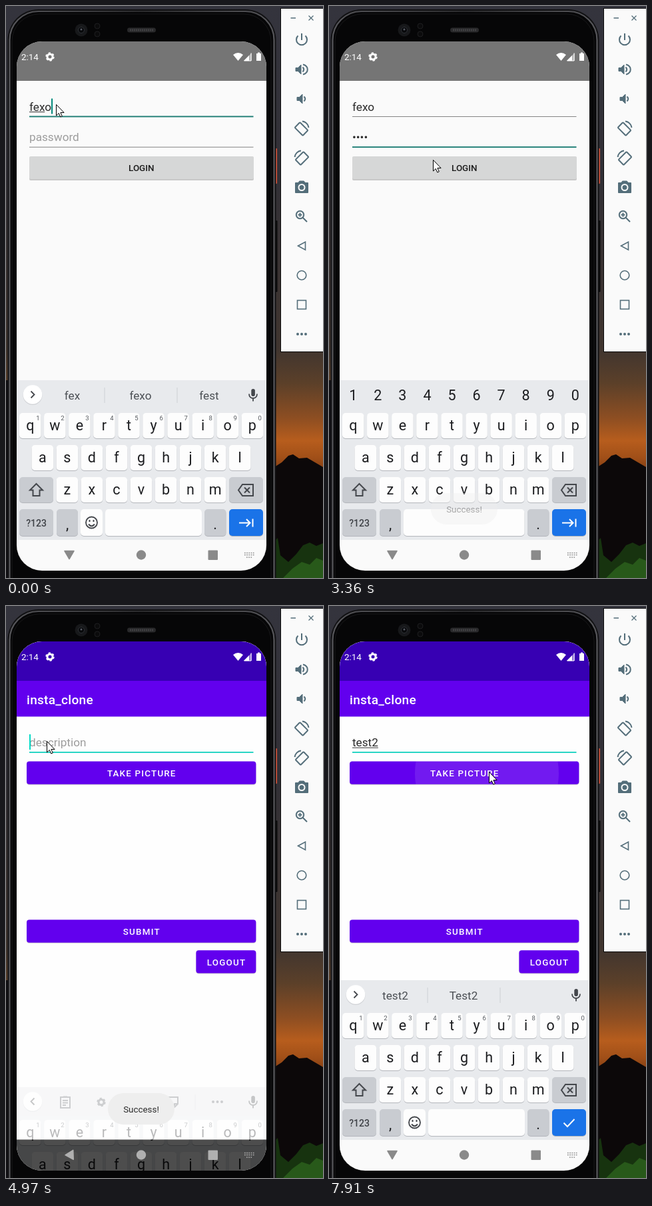
Recreate the animation shown at these times as an HTML page. Size 476 by 856 pixels, loop 8000 ms.

```html
<!DOCTYPE html>
<html lang="en">
<head>
<meta charset="utf-8">
<title>Login demo</title>
<style>
html, body { margin: 0; width: 100%; height: 100%; overflow: hidden; background: #0b0809; }
svg { display: block; width: 476px; height: 856px; font-family: Roboto, sans-serif; }
text { white-space: pre; }
.mid { text-anchor: middle; }
.field { font-size: 17.2px; }
.btn { font-size: 13.4px; font-weight: 500; text-anchor: middle; }
.wide { fill: #fff; letter-spacing: 1.2px; }
.key { font-size: 21.5px; fill: #1c1d20; text-anchor: middle; }
.line { fill: none; stroke-width: 2; }
.off { display: none; }
</style>
</head>
<body>
<svg id="stage" viewBox="0 0 476 856">
  <defs>
    <linearGradient id="sky" x2="0" y2="1">
      <stop offset="0" stop-color="#34343d"/>
      <stop offset=".3" stop-color="#323036"/>
      <stop offset=".6" stop-color="#40352f"/>
      <stop offset=".66" stop-color="#5c4029"/>
      <stop offset=".72" stop-color="#8d4e22"/>
      <stop offset=".76" stop-color="#b75d1d"/>
      <stop offset=".79" stop-color="#a04f18"/>
      <stop offset=".83" stop-color="#6a3011"/>
    </linearGradient>
    <linearGradient id="rim" x2="1">
      <stop offset="0" stop-color="#57575b"/>
      <stop offset=".5" stop-color="#2a2a2c"/>
      <stop offset="1" stop-color="#57575b"/>
    </linearGradient>
    <clipPath id="screen"><rect x="16" y="53" width="375" height="792" rx="38"/></clipPath>
    <clipPath id="loginClip"><rect x="35" y="225" width="337" height="34" rx="2"/></clipPath>
    <clipPath id="picClip"><rect x="31" y="232.400" width="344.400" height="34.400" rx="4"/></clipPath>
    <g id="gear">
      <circle r="4" fill="none" stroke="currentColor" stroke-width="3"/>
      <circle r="5.6" fill="none" stroke="currentColor" stroke-width="2.2" stroke-dasharray="3 2.86"/>
    </g>
    <g id="turn" class="line" stroke="#546e7a">
      <rect x="-5.500" y="-8.500" width="11" height="17" rx="1" transform="translate(-.5 1) rotate(-45)"/>
      <path d="M1-10.500A11 11 0 0 1 10.500-1"/>
    </g>
  </defs>

  <!-- wallpaper -->
  <rect width="476" height="856" fill="url(#sky)"/>
  <rect y="560" width="5" height="296" fill="#111014"/>
  <path d="M400 692L414 683 424 673 431 671 440 677 452 676 464 683 476 690V856H400Z" fill="#0c0809"/>
  <path d="M404 856V800L408 796 412 822 424 832 436 820 446 807 456 803 466 808 476 804V856Z" fill="#17330f"/>
  <path d="M416 856L430 842 444 832 456 836 466 826 476 830V856Z" fill="#28591a"/>

  <!-- phone body -->
  <rect x="403" y="213" width="4" height="53" rx="1" fill="#e2593f"/>
  <rect x="403" y="321" width="4.500" height="107" rx="1" fill="#0a0a0b"/>
  <rect x="2.500" y="5" width="403" height="900" rx="46" fill="#111113"/>
  <rect x="5.500" y="8" width="397" height="900" rx="43" fill="#060607" stroke="url(#rim)" stroke-width="2.200"/>
  <rect x="9" y="12" width="389" height="890" rx="41" fill="#060607" stroke="#18181a"/>
  <circle cx="113" cy="36" r="9.500" fill="#17181a"/>
  <circle cx="113" cy="36" r="4.500" fill="#08090b" stroke="#2e3136"/>
  <circle cx="113" cy="35" r="1.500" fill="#565b63"/>
  <g fill="#0b0b0c" stroke="#1e1e20"><circle cx="137" cy="30" r="4"/><circle cx="137" cy="42" r="4"/></g>
  <rect x="182" y="32.500" width="43" height="7" rx="3.500" fill="#29292b"/>
  <path d="M186 36H221" stroke="#414143" stroke-width="3" stroke-dasharray="2 1"/>

  <g clip-path="url(#screen)">
    <g id="login">
      <path d="M16 53H391V845H16Z" fill="#fafafa"/>
      <path d="M16 53H391V112H16Z" fill="#757575"/>
      <path d="M16 798.500H391V845H16Z"/>
      <g id="loginForm">
        <rect x="35" y="226" width="337" height="35" rx="2" fill="#000" opacity=".2"/>
        <rect x="35" y="225" width="337" height="34" rx="2" fill="#d6d7d7"/>
        <g clip-path="url(#loginClip)"><circle id="loginRip"/></g>
        <text class="btn" x="203.300" y="247" fill="#1d1d1d">LOGIN</text>
      </g>
    </g>
    <g id="main">
      <path d="M16 53H391V845H16Z" fill="#fefefe"/>
      <path d="M16 53H391V112H16Z" fill="#3700b3"/>
      <path d="M16 112H391V165.500H16Z" fill="#6200ee"/>
      <path d="M16 798.500H391V845H16Z"/>
      <text x="31" y="146.500" font-size="19.100" font-weight="500" letter-spacing=".24" fill="#fff">insta_clone</text>
      <g id="mainForm"></g>
    </g>
    <g id="keys"></g>
    <g id="nav">
      <path id="back" d="M-6 0L6-7V7Z" stroke="currentColor" stroke-width="1.500" stroke-linejoin="round" fill="currentColor"/>
      <circle cx="203" cy="821.500" r="7.200" fill="currentColor"/>
      <rect x="303.500" y="814.500" width="14.500" height="14.500" rx="1" fill="currentColor"/>
      <path id="kbIcon" d="M358 818.500H373M358 821.500H373M361 825H370" stroke="currentColor" stroke-width="1.700" stroke-dasharray="1.700 1.500"/>
    </g>
    <g id="toast">
      <rect x="153" y="729" width="100" height="47" rx="23.500" fill="#eee"/>
      <text x="203" y="758" class="mid" font-size="13.400" fill="#2b2b2b">Success!</text>
    </g>
    <g fill="#fff" color="#fff">
      <text x="23" y="81" font-size="13.400">2:14</text>
      <use href="#gear" x="66" y="76"/>
      <path d="M348.500 82L341 73Q348.500 67 356 73Z"/>
      <path d="M369 70V82H357Z" opacity=".45"/><path d="M365 74V82H357Z"/><path d="M368 70.500V82H357.500" fill="none" stroke="#fff"/>
      <path d="M376 71H378V69.500H381V71H383V82H376Z"/>
    </g>
  </g>

  <!-- emulator panel -->
  <rect x="412.500" y="3.500" width="70" height="514" fill="#fafafa" stroke="#0a0a0a"/>
  <path d="M427.500 18H435M454.500 14.500L461.500 21.500M461.500 14.500L454.500 21.500" stroke="#546e7a" stroke-width="1.300"/>
  <g class="line" stroke="#546e7a">
    <path d="M444 41V51M438.500 44.500A8 8 0 1 0 449.500 44.500"/>
    <path d="M435 92.500H438.500L443 88V102L438.500 97.500H435Z" fill="#546e7a" stroke-width="1"/>
    <path d="M445.500 91.500Q449 95 445.500 98.500M446 87.500C455 90 455 100 446 102.500"/>
    <path d="M437 136.500H440.500L445 132V146L440.500 141.500H437Z" fill="#546e7a" stroke-width="1"/>
    <path d="M447.500 135.500Q451 139 447.500 142.500"/>
    <use href="#turn" x="444" y="183"/>
    <use href="#turn" transform="translate(444 227) scale(-1 1)"/>
    <path d="M435 265H439L441 262.500H447L449 265H453V279H435Z" fill="#546e7a" stroke-linejoin="round"/>
    <circle cx="444" cy="271.500" r="4.500" stroke="#fafafa"/>
    <circle cx="441.500" cy="312.500" r="5.700"/><path d="M445.500 316.500L452 323M438.500 312.500H444.500M441.500 309.500V315.500"/>
    <path d="M438.500 359L449.500 353V365Z" stroke-width="1.600"/>
    <circle cx="444" cy="403" r="6.800" stroke-width="1.600"/>
    <rect x="437.500" y="440.500" width="13" height="13" stroke-width="1.600"/>
  </g>
  <g fill="#546e7a"><circle cx="438" cy="491" r="2"/><circle cx="444" cy="491" r="2"/><circle cx="450" cy="491" r="2"/></g>

  <path id="mouse" d="M0 0V16.500L3.800 13L6.300 18.500L8.800 17.400L6.400 12H11.600Z" fill="#fff" stroke="#000"/>
</svg>

<script>
const LOOP = 8000;
const $ = id => document.getElementById(id);
const show = (node, on) => node.classList.toggle('off', !on);

function add(parent, tag, attrs, text) {
  const node = document.createElementNS('http://www.w3.org/2000/svg', tag);
  set(node, attrs);
  if (text) node.textContent = text;
  return parent.appendChild(node);
}
function set(node, attrs) {
  for (const k in attrs) node.setAttribute(k, attrs[k]);
}

// Purple buttons: x, y, width, label
const form = $('mainForm');
[[31, 232.4, 344.4, 'TAKE PICTURE'], [31, 469.4, 344.4, 'SUBMIT'], [285.4, 515.2, 90, 'LOGOUT']]
  .forEach(([x, y, width, label], i) => {
    const height = 34.4;
    add(form, 'rect', { x, y: y + 1, width, height, rx: 4, opacity: .18 });
    add(form, 'rect', { x, y, width, height, rx: 4, fill: '#6200ee' });
    if (!i) add(add(form, 'g', { 'clip-path': 'url(#picClip)' }), 'circle', { id: 'picRip' });
    add(form, 'text', { class: 'btn wide', x: x + width / 2 + .6, y: y + 22.3 }, label);
  });

// Text field with hint, composing underline and caret
function makeField(parent, base, lineY, hint, accent, caretColor) {
  const line = add(parent, 'rect', { x: 35, width: 336.5 });
  const text = add(parent, 'text', { class: 'field', x: 35, y: base });
  const under = add(parent, 'rect', { x: 35, y: base + 1.6, height: 1, fill: '#333' });
  const caret = add(parent, 'rect', { y: base - 18, width: 2, height: 23, fill: caretColor });
  return (value, composed, focused, blink) => {
    text.textContent = value || hint;
    set(text, { fill: value ? '#2a2a2a' : '#9d9d9d' });
    set(line, focused ? { y: lineY - 1, height: 1.9, fill: accent } : { y: lineY - .5, height: 1, fill: '#858585' });
    set(under, { width: composed ? text.getSubStringLength(0, composed) : 0 });
    set(caret, { x: 35 + (value ? text.getComputedTextLength() : 0) });
    show(caret, focused && blink);
  };
}
const fields = {
  user: makeField($('loginForm'), 156.5, 165.5, '', '#1d7d74', '#00897b'),
  pass: makeField($('loginForm'), 202, 211.2, 'password', '#1d7d74', '#00897b'),
  desc: makeField(form, 210, 219, 'description', '#1fd3c3', '#03dac5')
};

// Keyboard
const keys = $('keys');
add(keys, 'rect', { x: 16, y: 560, width: 375, height: 240, fill: '#e8eaed' });
add(keys, 'rect', { x: 16, y: 799, width: 375, height: 46, fill: '#fafafa' });

function key(parent, x, y, width, label, fill = '#fdfdfd') {
  const height = y > 750 ? 40 : 38;
  add(parent, 'rect', { x, y: y + 1, width, height, rx: 5, fill: '#b4b7bc' });
  add(parent, 'rect', { x, y, width, height, rx: 5, fill });
  if (label) add(parent, 'text', { class: 'key', x: x + width / 2, y: y + 26 }, label);
}
const GREY = '#c9ccd1';
[['qwertyuiop', 20, 609], ['asdfghjkl', 38.5, 657], ['zxcvbnm', 75.5, 705]].forEach(([row, x, y]) =>
  [...row].forEach((c, i) => key(keys, x + i * 37.05, y, 32.6, c)));
const textOnly = add(keys, 'g', {}), passOnly = add(keys, 'g', {});
for (let i = 0; i < 10; i++) {
  const x = 36.3 + i * 37.05, digit = String((i + 1) % 10);
  add(textOnly, 'text', { class: 'mid', x: x + 11.5, y: 619.5, 'font-size': 9.5, fill: '#55595e' }, digit);
  add(passOnly, 'text', { class: 'key', x, y: 590 }, digit);
}
key(keys, 20, 705, 51, '', GREY);
key(keys, 335, 705, 51, '', GREY);
key(keys, 20, 753, 51, '', GREY);
key(keys, 76, 753, 32, '', GREY);
key(keys, 298, 753, 32.5, '', GREY);
key(keys, 335, 753, 51, '', '#1a73e8');
key(textOnly, 112, 753, 33, '');
key(textOnly, 149, 753, 145, '');
key(passOnly, 112, 753, 181.5, '');
add(keys, 'text', { class: 'mid', x: 45.5, y: 778.5, 'font-size': 14, 'font-weight': 500, fill: '#3f4247' }, '?123');
add(keys, 'text', { class: 'key', x: 92, y: 783 }, ',');
add(keys, 'text', { class: 'key', x: 314, y: 783 }, '.');

const stroke = (parent, d, color = '#44474c', width = 2) =>
  add(parent, 'path', { d, fill: 'none', stroke: color, 'stroke-width': width });
stroke(keys, 'M45.500 715L55 724.500H50.500V733H40.500V724.500H36Z');
stroke(keys, 'M355 716H371V733H355L349 724.500ZM358 720.500L366 728.500M366 720.500L358 728.500');
add(textOnly, 'circle', { cx: 128.5, cy: 773, r: 8.5, fill: 'none', stroke: '#44474c', 'stroke-width': 1.8 });
stroke(textOnly, 'M124 775.500Q128.500 781 133 775.500M125.500 769V772M131.500 769V772');
const tabIcon = stroke(keys, 'M350 773.500H366M361 768L366.500 773.500L361 779M370.500 767.500V779.500', '#fff');
const checkIcon = stroke(keys, 'M352.500 773.500L358 779L368.500 768', '#fff');

// Suggestion strip
add(textOnly, 'circle', { cx: 40, cy: 582.5, r: 14.5, fill: '#cfd1d5' });
add(textOnly, 'circle', { cx: 40, cy: 581.5, r: 14.3, fill: '#fff' });
const chevron = stroke(textOnly, 'M-2.500-5L2.500 0L-2.500 5', '#44474c', 1.8);
add(textOnly, 'rect', { x: 368.3, y: 573, width: 5.6, height: 11, rx: 2.8, fill: '#44474c' });
stroke(textOnly, 'M365 580.500C365 589 377 589 377 580.500M371 587V591.500', '#44474c', 1.8);
const words = add(textOnly, 'g', {}), tools = add(textOnly, 'g', { color: '#5f6368' });
stroke(words, 'M148 571V594M257 571V594', '#cdd0d4', 1);
const picks = [99.5, 202, 305].map(x =>
  add(words, 'text', { class: 'field mid', x, y: 588.5, fill: '#4b4f54' }));
stroke(tools, 'M82 575H96V591H82ZM86 574.500H92M85 580H93M85 583.500H93M85 587H90', '#5f6368');
add(tools, 'use', { href: '#gear', x: 143, y: 582.5 });
add(tools, 'text', { class: 'mid', x: 197, y: 587, 'font-size': 12, 'font-weight': 700, fill: '#5f6368' }, 'GIF');
stroke(tools, 'M244 575H258V585L253 590H244ZM253 590V585H258', '#5f6368');
stroke(tools, 'M284 571V594', '#cdd0d4', 1);
for (const cx of [311, 317.5, 324]) add(tools, 'circle', { cx, cy: 582, r: 2, fill: '#5f6368' });

// Each step changes part of the state from its time on
const NAME = 'fexo';
const STEPS = [
  [0, { mouse: [75, 147], focus: 'user', user: NAME, pass: '', desc: '', composed: 3, blink: true,
        picks: ['fex', NAME, 'fest'], board: 'text', slide: 0, fade: 1, zoom: 0, grow: 1, toast: 0,
        rip: [0, 0, 0, 0], turn: -90, nav: '#8a8a8a' }],
  [150, { composed: 4, picks: [NAME, 'Fexo', 'festival'] }],
  [680, { focus: 'pass', composed: 0, board: 'pass' }],
  [1110, { blink: false }],
  [1420, { blink: true, pass: 'f' }],
  [1570, { pass: '••x' }],
  [1690, { pass: '•••o' }],
  [2250, { blink: false, mouse: [83, 150] }],
  [2400, { mouse: [127, 184] }],
  [2550, { mouse: [150, 219] }],
  [2670, { mouse: [156, 228], blink: true }],
  [2820, { mouse: [156, 230] }],
  [2970, { rip: [170, 240, 90, .1] }],
  [3090, { rip: [203, 242, 200, .13] }],
  [3240, { rip: [203, 242, 200, .05], blink: false, pass: '••••' }],
  [3360, { rip: [0, 0, 0, 0], toast: .4 }],
  [3480, { board: '', zoom: .967, grow: 1.0386, toast: .8, focus: '', turn: -78, nav: '#828282' }],
  [3600, { zoom: .996, grow: 1.048, toast: 1, turn: -20, nav: '#b4b4b4' }],
  [3740, { zoom: 1, turn: 0, nav: '#c8c8c8' }],
  [4170, { mouse: [76, 190] }],
  [4290, { mouse: [42, 181] }],
  [4430, { mouse: [54, 194] }],
  [4560, { mouse: [61, 202] }],
  [4700, { focus: 'desc', blink: true }],
  [4830, { kb: true }],
  [4970, { board: 'text', picks: null, slide: 160, fade: .3, turn: -2, nav: '#b0b0b0' }],
  [5090, { slide: 40, fade: .85, turn: -65, nav: '#989898' }],
  [5210, { slide: 0, fade: 1, turn: -90, nav: '#8a8a8a', blink: false }],
  [5330, { toast: .5 }],
  [5450, { toast: 0, desc: 't', blink: true }],
  [5570, { desc: 'te', composed: 1, picks: ['t', 'test', 'thanks'] }],
  [5690, { desc: 'test', composed: 3, picks: ['te', 'test', 'thanks'] }],
  [5840, { composed: 4 }],
  [5960, { picks: ['test', 'Test', 'testing'] }],
  [6390, { blink: false }],
  [6970, { desc: 'test2', blink: true }],
  [7090, { composed: 5 }],
  [7240, { picks: ['test2', 'Test2', ''] }],
  [7390, { mouse: [61, 174] }],
  [7510, { mouse: [61, 159] }],
  [7660, { mouse: [240, 248], blink: false }],
  [7910, { rip: [237, 250, 108, .1] }]
];

const about = s => `translate(203.5 449) scale(${s}) translate(-203.5 -449)`;

function draw(s) {
  const inMain = s.zoom > 0;
  for (const id in fields) {
    const active = s.focus === id;
    fields[id](s[id], active ? Math.min(s.composed, s[id].length) : 0, active, s.blink);
  }
  show($('main'), inMain);
  show($('loginForm'), !inMain);
  set($('main'), { transform: about(s.zoom || 1) });
  set($('login'), { transform: about(s.grow) });

  show(keys, s.board);
  show(textOnly, s.board === 'text');
  show(passOnly, s.board === 'pass');
  show(tabIcon, !inMain);
  show(checkIcon, inMain);
  show(words, s.picks);
  show(tools, !s.picks);
  picks.forEach((p, i) => p.textContent = s.picks ? s.picks[i] : '');
  set(chevron, { transform: `translate(40 581.5) scale(${s.picks ? 1 : -1} 1)` });
  set(keys, { transform: `translate(0 ${s.slide})`, opacity: s.fade });

  set($('nav'), { color: s.nav });
  set($('back'), { transform: `translate(95 821.5) rotate(${s.turn})` });
  show($('kbIcon'), s.board || s.kb);
  set($('toast'), { opacity: s.toast });
  const [cx, cy, r, opacity] = s.rip;
  set($('loginRip'), { cx, cy, r, opacity });
  set($('picRip'), { cx, cy, r, opacity, fill: '#fff' });
  set($('mouse'), { transform: `translate(${s.mouse[0] + .5} ${s.mouse[1] + .5})` });
}

let last = 0;
function frame() {
  const t = performance.now() % LOOP;
  const past = STEPS.filter(([at]) => at <= t);
  if (past.length !== last) {
    last = past.length;
    draw(Object.assign({}, ...past.map(step => step[1])));
  }
  requestAnimationFrame(frame);
}
frame();
</script>
</body>
</html>
```
